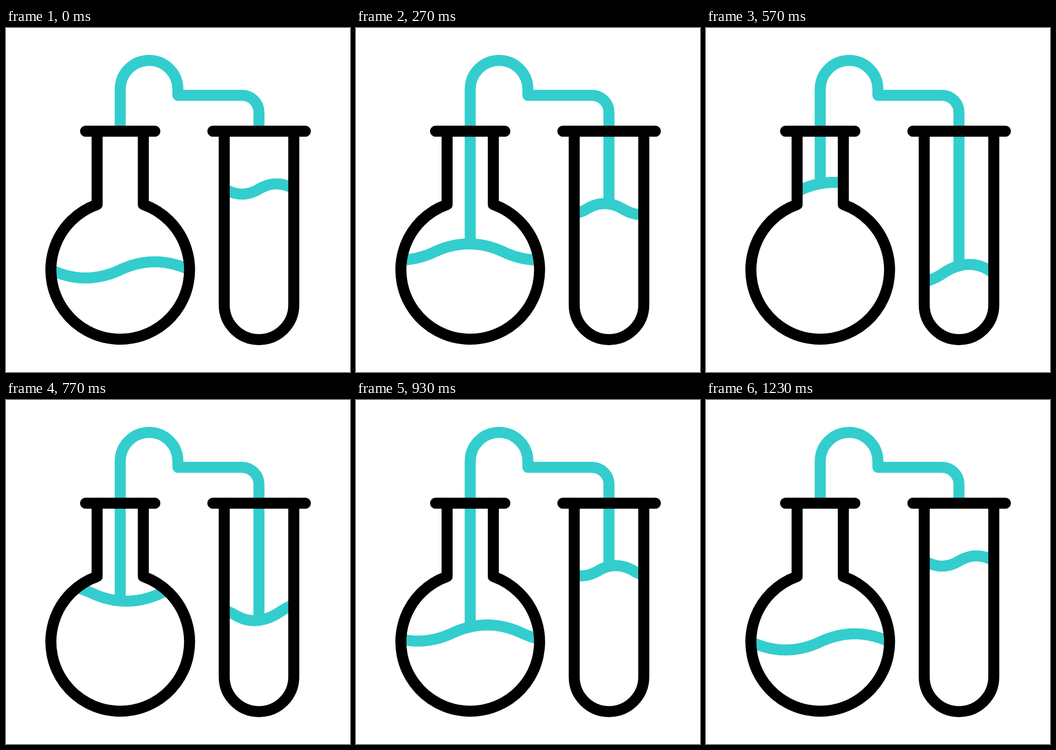
Write an HTML page that moves like this. It is 640x640 px and loops after 1.67 s.

```html
<!DOCTYPE html>
<html lang="en">
<head>
<meta charset="utf-8">
<title>Distillation</title>
<style>
  html, body { margin: 0; height: 100%; overflow: hidden; background: #fff; }
  svg { display: block; width: 100%; height: 100%; }
  g { fill: none; stroke-width: 20.5; stroke-linecap: round; stroke-linejoin: round; }
  .liquid { stroke: #33cdcd; }
  .glass { stroke: #000; }
</style>
</head>
<body>
<svg viewBox="0 0 640 640">
  <defs>
    <path id="flask" d="M169.5 192V328.3A129 129 0 1 0 255.5 328.3V192"/>
    <path id="tube" d="M406 192V515A64.7 64.7 0 0 0 535.4 515V192"/>
    <clipPath id="inFlask"><use href="#flask"/></clipPath>
    <clipPath id="inTube"><use href="#tube"/></clipPath>
  </defs>
  <g class="liquid">
    <path d="M212.5 190V114A53.6 53.6 0 0 1 319.8 114V125.3H439A31.6 31.6 0 0 1 470.6 157V190"/>
    <path id="flaskPipe"/>
    <path id="tubePipe"/>
    <g clip-path="url(#inFlask)"><path id="flaskWave"/></g>
    <g clip-path="url(#inTube)"><path id="tubeWave"/></g>
  </g>
  <g class="glass">
    <use href="#flask"/>
    <use href="#tube"/>
    <path d="M148 192H277M384.8 192H557"/>
  </g>
</svg>
<script>
const LOOP = 1670, FRAME = 100 / 3, RIM = 190;

// extrema: alternating troughs and crests of the surface at rest
const vessels = [
  { name: 'flask', left: 70, right: 355, pipeX: 212.5, shift: 297, rise: -148,
    extrema: [[19, 435], [148, 465], [277, 435], [406, 465], [535, 435], [664, 465]] },
  { name: 'tube', left: 400, right: 541, pipeX: 470.6, shift: 181, rise: 163,
    extrema: [[375, 290], [439, 309], [503, 290], [572, 310.5], [671, 277], [760, 309]] }
];

const ramp = (t, from, to) => {
  const u = Math.min(1, Math.max(0, (t - from) / (to - from)));
  return u * u * (3 - 2 * u);
};

// each half wave is two parabolic arcs that meet in the middle
function waveY(extrema, x) {
  let i = 1;
  while (i < extrema.length - 1 && x > extrema[i][0]) i++;
  const [x0, y0] = extrema[i - 1], [x1, y1] = extrema[i];
  const u = (x - x0) / (x1 - x0);
  return y0 + (y1 - y0) * (u < 0.5 ? 2 * u * u : 1 - 2 * (1 - u) ** 2);
}

const setPath = (id, d) => document.getElementById(id).setAttribute('d', d);

function draw(t) {
  const flow = ramp(t, 130, 575) - ramp(t, 575, 1027);
  const dip = ramp(t, 0, 180) - ramp(t, 1020, 1220);
  for (const v of vessels) {
    const surface = x => waveY(v.extrema, x + v.shift * flow) + v.rise * flow;
    const points = [];
    for (let x = v.left; x <= v.right; x += 3) points.push(x + ' ' + surface(x).toFixed(2));
    setPath(v.name + 'Wave', 'M' + points.join('L'));
    setPath(v.name + 'Pipe', `M${v.pipeX} ${RIM}V${RIM + (surface(v.pipeX) - RIM) * dip}`);
  }
}

function tick() {
  // the motion advances at 30 steps per second
  const step = Math.floor((performance.now() % LOOP + 4) / FRAME);
  draw(step * FRAME);
  requestAnimationFrame(tick);
}
tick();
</script>
</body>
</html>
```
